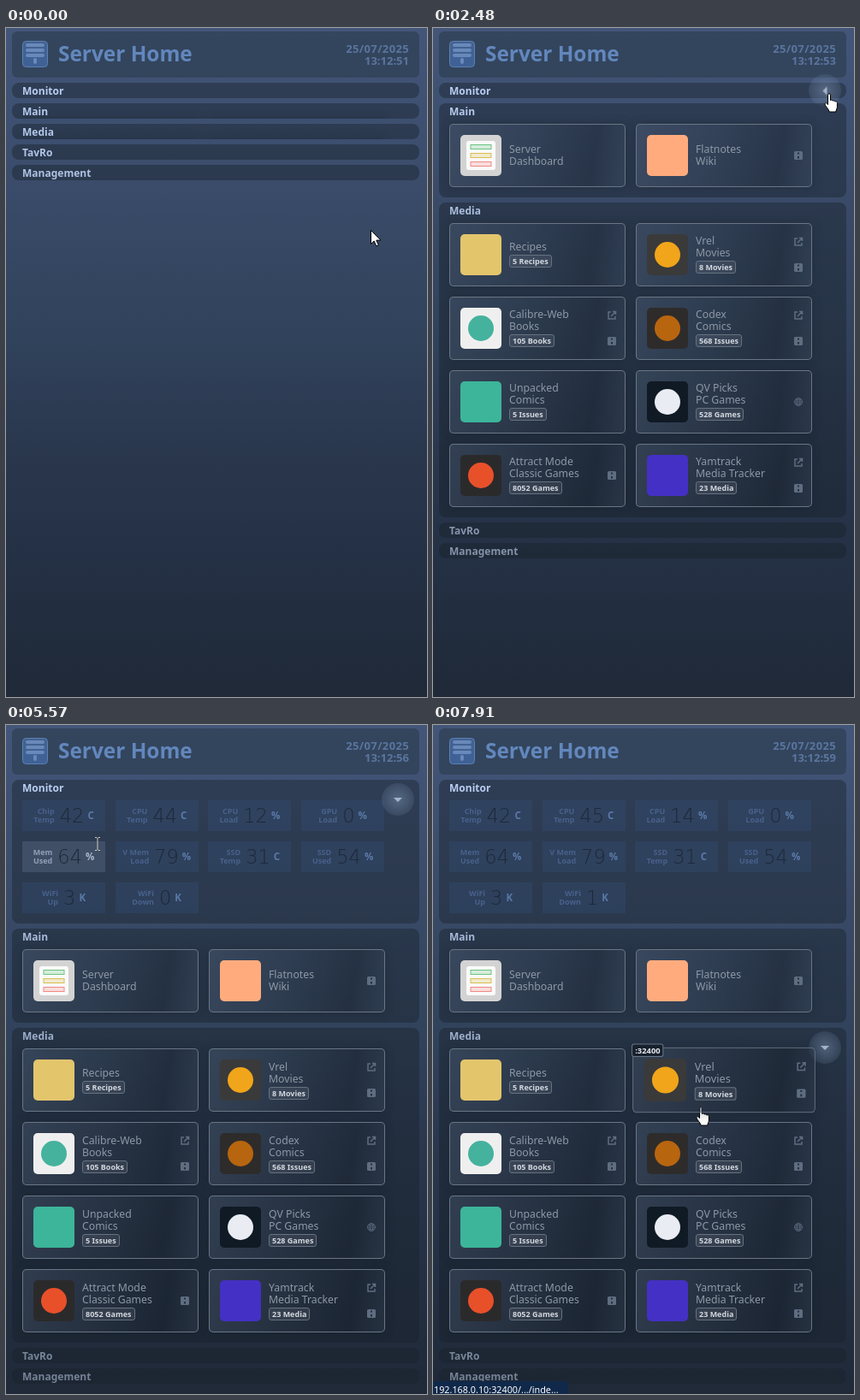
Recreate the animation shown at these times as an HTML page. Size 492x782 px, loop 8 s.

```html
<!DOCTYPE html>
<html lang="en">
<head>
<meta charset="utf-8">
<title>Server Home</title>
<style>
* { box-sizing: border-box; margin: 0; }
html, body { width: 100%; height: 100%; overflow: hidden; }
body { font: 12.25px/14px "Noto Sans", sans-serif; cursor: default; }
#stage {
  position: relative; width: 492px; height: 782px; overflow: hidden;
  background: linear-gradient(#43567a, #3a4b69 25%, #30415a 48%, #29364c 65%, #243044 80%, #1f2938);
}
header, .sec { position: absolute; left: 7px; width: 476px; }
header { top: 4px; height: 54px; border-radius: 6px; background: #32445ae6; color: #6287bd; }
header svg { position: absolute; left: 12px; top: 11px; }
h1 { position: absolute; left: 54px; top: 9px; font-size: 24.4px; line-height: 34px; }
.now { position: absolute; right: 12px; top: 13px; text-align: right; font: bold 13px/14px "Noto Sans", sans-serif; color: #5a759f; }
.now div:first-child { letter-spacing: .35px; }
#list { position: absolute; left: 7px; top: 64px; width: 476px; display: flex; flex-direction: column; gap: 6px; }
.sec { position: relative; left: 0; height: 18px; flex: none; }
.clip { position: absolute; inset: 0; overflow: hidden; border-radius: 8px; background: #1b242c70; }
h2 { position: absolute; left: 12px; top: 0; font-size: 12px; line-height: 19px; }
.body { position: absolute; left: 0; top: 18px; }
.tog {
  position: absolute; left: 432px; top: -10px; width: 38px; height: 38px; border-radius: 50%;
  background: radial-gradient(#93a9c866, #7e95b63a 55%, #7e95b61c 80%, #7e95b600);
}
.tog i { position: absolute; left: 14px; top: 16.5px; border: 5px solid transparent; border-top-color: #a3b4cc; border-bottom: 0; }
.chip {
  --h: 0; position: absolute; width: 97px; height: 36px; display: flex; align-items: center; justify-content: center;
  background: color-mix(in srgb, #8a8f96a0 calc(var(--h) * 60%), #33507a4d);
}
.chip small { font: bold 9px/10px "Noto Sans", sans-serif; text-align: right; white-space: pre; color: color-mix(in srgb, #d8dee6 calc(var(--h) * 100%), #49618b); }
.chip b { font: 200 22.5px/36px "DejaVu Sans", sans-serif; margin: 0 4px 0 6px; color: #1d2939; }
.chip u { font: bold 11.5px/14px "Noto Sans", sans-serif; text-decoration: none; color: color-mix(in srgb, #eef1f5 calc(var(--h) * 100%), #5b79a8); }
.slot { position: absolute; width: 206px; height: 74px; }
.card {
  position: relative; height: 100%; border-radius: 5px; color: #8e99a7;
  background: linear-gradient(100deg, #8095b42e, #8095b412 45%, #10182226 80%, #8095b418);
  box-shadow: inset 0 0 0 1px #6a7685, 0 0 12px #10182250;
}
.tile { position: absolute; left: 13px; top: 13px; }
.text { position: absolute; left: 70px; top: 0; height: 74px; display: flex; flex-direction: column; justify-content: center; align-items: flex-start; white-space: pre; }
.badge { margin-top: 2px; height: 15px; padding: 0 3px; border: 1px solid #66727f; border-radius: 3px; background: #ffffff12; color: #d3d8df; font: bold 9px/13px "Noto Sans", sans-serif; }
.link { position: absolute; left: 184px; }
.tag { position: absolute; left: -1px; top: -4px; height: 15px; padding: 0 3px; border: 1px solid #6a7685; border-radius: 3px; background: #17202d; color: #e8ebef; font: bold 9px/13px "Noto Sans", sans-serif; }
#status { position: absolute; left: 0; top: 767px; height: 20px; min-width: 158px; padding: 0 1px; border-radius: 0 3px 0 0; background: #10294a; color: #fff; font: 10.8px/20px "Noto Sans", sans-serif; white-space: nowrap; }
#cursor { position: absolute; left: 0; top: 0; overflow: visible; }
</style>
</head>
<body>
<div id="stage">
  <header>
    <svg width="30" height="31" fill="#83a4d6">
      <defs><linearGradient id="blue" x2="0" y2="1"><stop stop-color="#43628f"/><stop offset="1" stop-color="#3f6196"/></linearGradient></defs>
      <rect x=".5" y=".5" width="29" height="30" rx="4" fill="url(#blue)" stroke="#5b80b3"/>
      <g opacity=".6"><rect x="4" y="3" width="22" height="4" rx="2"/><rect x="4" y="9" width="22" height="4" rx="2"/><rect x="4" y="15" width="22" height="4" rx="2"/><rect x="13" y="20" width="4" height="7" rx="2"/></g>
    </svg>
    <h1>Server Home</h1>
    <div class="now"><div>25/07/2025</div><div id="clock"></div></div>
  </header>
  <div id="list"></div>
  <div id="status"></div>
  <svg id="cursor" width="1" height="1"><path/></svg>
</div>
<script>
const LOOP = 8000, STEP = 129.7;
const $ = id => document.getElementById(id);

function add(parent, cls, html = '') {
  const el = document.createElement('div');
  el.className = cls;
  el.innerHTML = html;
  return parent.appendChild(el);
}

const CHIPS = [
  ['Chip\nTemp', 'C'], ['CPU\nTemp', 'C'], ['CPU\nLoad', '%'], ['GPU\nLoad', '%'],
  ['Mem\nUsed', '%'], ['V Mem\nLoad', '%'], ['SSD\nTemp', 'C'], ['SSD\nUsed', '%'],
  ['WiFi\nUp', 'K'], ['WiFi\nDown', 'K']
];

// readings by start time: CPU temp, CPU load, WiFi up, WiFi down
const READINGS = [[0, 47, 7, 1, 5], [4100, 47, 14, 7, 2], [5200, 44, 12, 3, 0], [7200, 45, 14, 3, 1]];

// title, badge, tile, mark, side icons
const MAIN = [
  ['Server\nDashboard', '', '#d3d3d3', 'bars', ''],
  ['Flatnotes\nWiki', '', '#ffab7d', '', 'i']
];
const MEDIA = [
  ['Recipes', '5 Recipes', '#e3c56c', '', ''],
  ['Vrel\nMovies', '8 Movies', '#3a3a3a', '#f0a51a', 'li'],
  ['Calibre-Web\nBooks', '105 Books', '#efefef', '#45b29d', 'li'],
  ['Codex\nComics', '568 Issues', '#2e2c2b', '#b8650f', 'li'],
  ['Unpacked\nComics', '5 Issues', '#3cb59a', '', ''],
  ['QV Picks\nPC Games', '528 Games', '#101a24', '#e9ecf2', 'g'],
  ['Attract Mode\nClassic Games', '8052 Games', '#2b2a2b', '#e8502a', 'i'],
  ['Yamtrack\nMedia Tracker', '23 Media', '#4430c4', '', 'li']
];

// name, opening time, open height
const SECTIONS = [['Monitor', 2650, 168], ['Main', 1965, 110], ['Media', 1037, 368], ['TavRo'], ['Management']];

const GLYPHS = {
  l: '<path d="M5 2H2v8h8V7M7 1.500h3.500V5M10.500 1.500L5 7" fill="none" stroke="#5f6d80" stroke-width="1.500"/>',
  i: '<rect x="1" y="1" width="10" height="10" rx="1.500" fill="#5f6d80"/><path d="M6 2.500v2M6 7v2.500" stroke="#263244" stroke-width="2"/>',
  g: '<g fill="none" stroke="#566478"><circle cx="6" cy="6" r="4.500"/><ellipse cx="6" cy="6" rx="2" ry="4.500"/><path d="M1.500 6h9M2.500 3.700h7M2.500 8.300h7"/></g>'
};

function mark(kind) {
  if (!kind) return '';
  if (kind !== 'bars') return `<circle cx="24" cy="24" r="15" fill="${kind}"/>`;
  const bar = (y, c) => `<rect x="12" y="${y}" width="24" height="5" fill="${c}44" stroke="${c}"/>`;
  return '<rect x="7" y="7" width="34" height="34" rx="3" fill="#fafafa"/>' +
    bar(11.5, '#6cc482') + bar(21.5, '#d8bd55') + bar(31.5, '#f08a86');
}

const anims = [];
function ease(el, start, frames) {
  const a = el.animate(frames, { duration: 500, delay: start, easing: 'ease', fill: 'both' });
  a.pause();
  anims.push(a);
}

const sections = SECTIONS.map(([name, start, height]) => {
  const el = add($('list'), 'sec'), clip = add(el, 'clip');
  const body = add(clip, 'body');
  const title = clip.appendChild(document.createElement('h2'));
  title.textContent = name;
  const tog = add(el, 'tog', '<i></i>');
  if (start) {
    ease(el, start, { height: ['18px', height + 'px'] });
    ease(body, start, { top: ['18px', '24px'] });
    ease(tog, start, { top: ['-10px', '4px'] });
    ease(tog.firstChild, start, { transform: ['rotate(90deg)', 'rotate(0deg)'] });
  } else tog.firstChild.style.transform = 'rotate(90deg)';
  return { el, body, title, tog };
});

const chips = CHIPS.map(([label, unit], n) => {
  const el = add(sections[0].body, 'chip', `<small>${label}</small><b></b><u>${unit}</u>`);
  el.style.left = 12 + n % 4 * 108.7 + 'px';
  el.style.top = (n >> 2) * 48 + 'px';
  return { el, value: el.querySelector('b') };
});

function makeCard(sec, [title, badge, tile, kind, side], n) {
  const slot = add(sec.body, 'slot');
  slot.style.left = 12 + n % 2 * 218 + 'px';
  slot.style.top = (n >> 1) * 86 + 'px';
  const links = [...side].map((g, i) => {
    const y = side.length > 1 ? 16 + i * 30 : 31;
    return `<svg class="link" style="top:${y}px" width="12" height="12">${GLYPHS[g]}</svg>`;
  });
  const card = add(slot, 'card',
    `<svg class="tile" width="48" height="48"><rect width="48" height="48" rx="5" fill="${tile}"/>${mark(kind)}</svg>` +
    `<div class="text"><div>${title}</div>${badge && `<div class="badge">${badge}</div>`}</div>` + links.join(''));
  const port = title.startsWith('Vrel') ? ':32400' : '';
  return { sec, slot, card, port, tag: port && add(card, 'tag', port) };
}
const cards = [
  ...MAIN.map((c, n) => makeCard(sections[1], c, n)),
  ...MEDIA.map((c, n) => makeCard(sections[2], c, n))
];

// pointer: time, x, y, shape
const PATH = [
  [0, 426, 236, 'arrow'], [250, 418, 222, 'arrow'], [510, 440, 150, 'arrow'], [640, 448, 128, 'hand'],
  [770, 452, 121, 'hand'], [900, 452, 121, 'hand'], [1035, 456, 118, 'hand'], [1440, 456, 118, 'hand'],
  [1810, 458, 98, 'hand'], [2060, 458, 98, 'hand'], [2200, 463, 76, 'hand'], [2700, 463, 76, 'hand'],
  [3240, 440, 102, 'hand'], [3500, 437, 112, 'hand'], [3760, 425, 242, 'arrow'], [4000, 370, 160, 'arrow'],
  [4150, 310, 116, 'beam'], [4530, 276, 113, 'beam'], [4900, 262, 112, 'beam'], [5300, 180, 115, 'beam'],
  [5700, 75, 150, 'beam'], [5950, 45, 160, 'beam'], [6070, 52, 174, 'arrow'], [6220, 60, 180, 'arrow'],
  [6350, 64, 242, 'arrow'], [6480, 66, 263, 'hand'], [6740, 100, 300, 'hand'], [7000, 165, 345, 'hand'],
  [7130, 180, 390, 'hand'], [7390, 214, 428, 'hand'], [7640, 285, 440, 'hand'], [7900, 313, 446, 'hand']
];
const SHAPES = {
  arrow: 'M.5.5v16l3.700-3.500 2.500 5.900 2.600-1.100-2.500-5.700h5.100z',
  hand: 'M-1.500 2.200C-1.500.2 1.500.2 1.500 2.200V8.500C2 7.600 4 7.800 4.200 9.200c.8-.8 2.500-.4 2.600.9c.9-.7 2.600-.2 2.600 1.200V16c0 2.500-1.400 3.500-1.600 6H.2C-.2 19-5 15-5.100 13c-.1-1.500 1.800-1.900 2.600-.6l1 1.200z',
  beam: 'M-3-7.500h2l1 1 1-1h2M0-6.500v13M-3 7.500h2l1-1 1 1h2'
};

function pointer(t) {
  t = Math.max(0, t);
  const i = PATH.findLastIndex(p => p[0] <= t);
  const a = PATH[i], b = PATH[i + 1] || a;
  const f = a === b ? 0 : (t - a[0]) / (b[0] - a[0]);
  return { x: a[1] + (b[1] - a[1]) * f, y: a[2] + (b[2] - a[2]) * f, shape: a[3] };
}

// share of the latest pointer positions that lie inside every box
function heat(trail, ...els) {
  const o = $('stage').getBoundingClientRect();
  const boxes = els.map(e => e.getBoundingClientRect());
  const hits = trail.filter(({ x, y }) => boxes.every(r =>
    x >= r.left - o.left && x < r.right - o.left && y >= r.top - o.top && y < r.bottom - o.top));
  return hits.length / trail.length;
}

function render(t) {
  anims.forEach(a => { a.currentTime = t; });
  $('clock').textContent = '13:12:' + (51 + Math.floor((t + 300) / 1000));

  const [, temp, load, up, down] = READINGS.findLast(r => r[0] <= t);
  const trail = [0, 1, 2].map(i => pointer(t - i * STEP));
  [42, temp, load, 0, 64, 79, 31, 54, up, down].forEach((v, n) => {
    const { el, value } = chips[n];
    value.textContent = v;
    el.style.setProperty('--h', heat(trail.slice(0, 2), el, sections[0].el));
  });

  for (const s of sections) {
    const p = s.el.offsetTop / 690;
    s.title.style.color = `rgb(${184 - 66 * p},${205 - 74 * p},${240 - 90 * p})`;
    s.tog.style.opacity = heat(trail, s.el);
  }

  let status = '';
  for (const c of cards) {
    const h = heat(trail, c.slot, c.sec.el);
    c.slot.style.zIndex = h ? 1 : 0;
    c.card.style.transform = `scale(${1 + .038 * h})`;
    c.card.style.backgroundColor = `rgba(30,40,54,${.5 * h})`;
    if (c.tag) c.tag.style.opacity = h;
    if (h > .5) status = `192.168.0.10${c.port}/.../inde...`;
  }
  $('status').textContent = status;
  $('status').style.display = status ? '' : 'none';

  const { x, y, shape } = trail[0], path = $('cursor').firstElementChild;
  const beam = shape === 'beam';
  path.setAttribute('d', SHAPES[shape]);
  path.setAttribute('transform', `translate(${Math.round(x)} ${Math.round(y)})`);
  path.setAttribute('fill', beam ? 'none' : '#fff');
  path.setAttribute('stroke', beam ? '#cfc8bb' : '#000');
}

const begin = performance.now();
let shown = -1;
function tick() {
  const t = (performance.now() - begin) % LOOP;
  const k = Math.min(61, Math.floor((t + 16) / STEP));
  if (k !== shown) render((shown = k) * STEP);
  requestAnimationFrame(tick);
}
tick();
</script>
</body>
</html>
```
